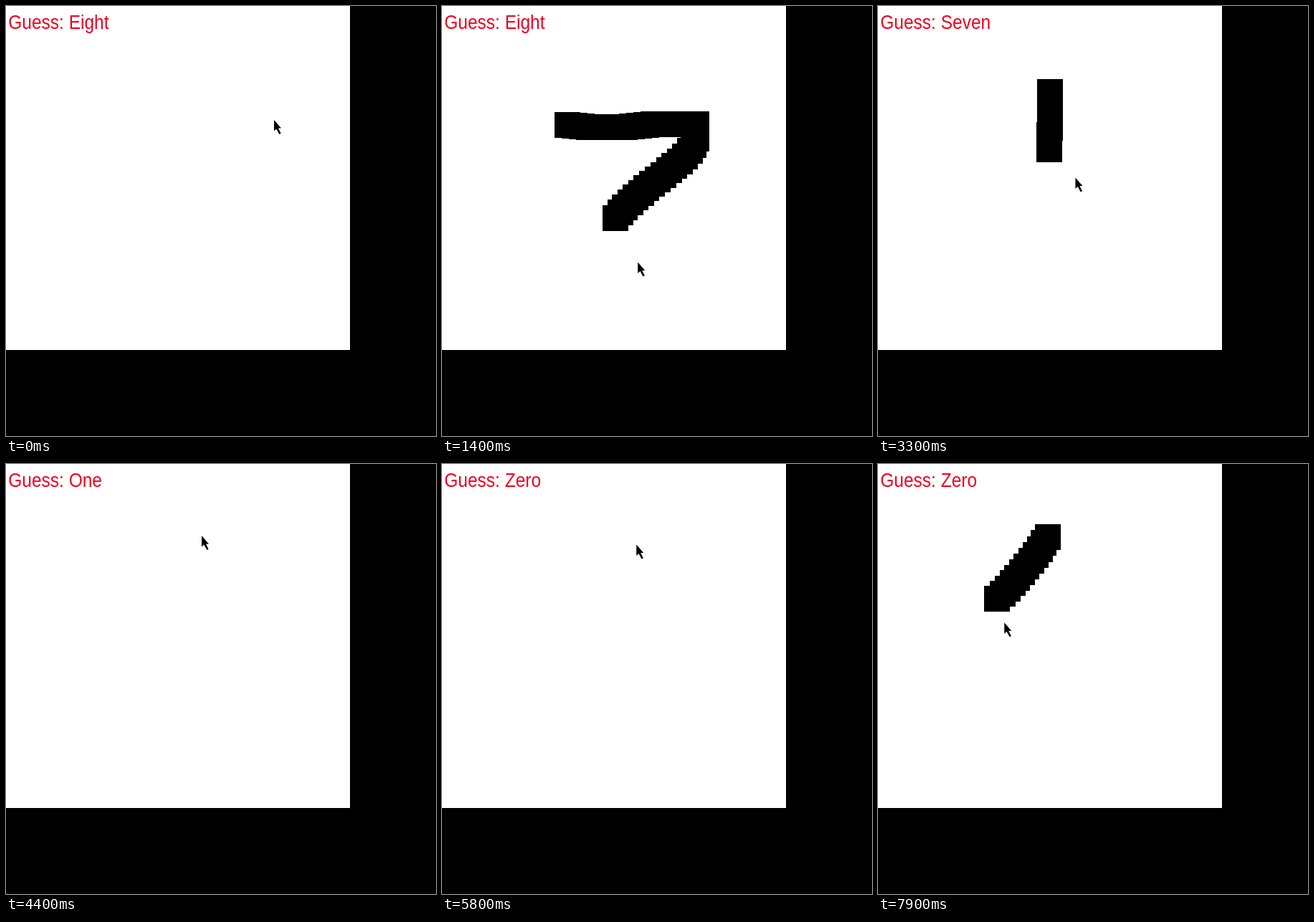
An HTML page that plays this animation: 600x600 px, repeating every 8 s.

```html
<!DOCTYPE html>
<html lang="en">
<head>
<meta charset="utf-8">
<title>Digit guess</title>
<style>
  html, body { margin: 0; width: 100%; height: 100%; overflow: hidden; background: #000; }
  svg { display: block; width: 100vw; height: 100vh; }
  text { font: 28px "Liberation Sans", Arial, sans-serif; fill: #f0001e; }
</style>
</head>
<body>
<svg viewBox="0 0 600 600">
  <rect width="600" height="600"/>
  <rect width="480" height="480" fill="#fff"/>
  <path id="ink" shape-rendering="crispEdges"/>
  <text id="guess" transform="translate(3.3 32) scale(.875 1)"></text>
  <path id="cursor" d="M0 0V15.5L3.2 12.6 7.4 20 9.6 18.8 6 11.5H10Z"
        stroke="#fff" stroke-width="1.5" paint-order="stroke"/>
</svg>
<script>
const LOOP = 8000, TICK = 100;
const PEN = 36, STEP = 10;    // square pen, distance between stamps
const POINTER_SCALE = 1.25;   // pointer space is 600 wide, the sheet 480

const linear = p => p;
const smooth = p => p * p * (3 - 2 * p);
const easeOut = p => Math.sin(p * Math.PI / 2);

const guesses = [[0, 'Eight'], [1700, 'Seven'], [3900, 'One'], [5700, 'Zero']];

// Points at even distances along a curve.
function walk(d) {
  const curve = document.createElementNS('http://www.w3.org/2000/svg', 'path');
  curve.setAttribute('d', d);
  const length = curve.getTotalLength(), steps = Math.round(length / STEP);
  return Array.from({ length: steps + 1 }, (_, i) => curve.getPointAtLength(length * i / steps));
}

const draw = (from, to, clear, d, ease = linear) => ({ from, to, clear, ease, points: walk(d) });
const hover = (from, to, d) => draw(from, to, 0, d, smooth);

const moves = [
  hover(100, 400, 'M299.2 127.2Q165 180 157 148'),

  // seven: bar, then diagonal
  draw(800, 1000, 1700, 'M157 148Q210 155 281 147H337'),
  draw(1000, 1560, 1700, 'M337 147V168C328 200 252 238 222 281S196 335 192 360'),
  hover(1900, 2800, 'M192 360Q205 250 222 102'),

  // one
  draw(3200, 3680, 3900, 'M222 102Q222 250 205 370', easeOut),
  hover(3900, 4400, 'M205 370Q207 220 218.4 80'),

  // zero: long loop, then closing arc
  draw(4700, 5300, 5700, 'M212 89C166 156 134 210 136 290 136 340 170 381 221 381 ' +
    '290 381 329 274 329 205 329 172 320 145 306 118'),
  draw(5300, 5600, 5700, 'M306 118C295 98 265 88 217 90'),
  hover(6100, 6600, 'M217 90Q150 112 89.8 109.4'),
  hover(6800, 7500, 'M89.8 109.4C60 135 140 125 219 84'),

  // two: first stroke
  draw(7700, 7900, LOOP, 'M219 84Q187 134 141 177')
];

const byId = id => document.getElementById(id);
const ink = byId('ink'), guess = byId('guess'), cursor = byId('cursor');

// Index of the point a move has reached at time t.
function reached({ from, to, ease, points }, t) {
  const p = Math.min(1, Math.max(0, (t - from) / (to - from)));
  return Math.round(ease(p) * (points.length - 1));
}

const stamp = ({ x, y }) => `M${Math.round(x)} ${Math.round(y)}h${PEN}v${PEN}h-${PEN}z`;

function render(time) {
  const t = Math.floor(time % LOOP / TICK) * TICK;
  const current = moves.findLast(m => m.from <= t) || moves[0];
  const { x, y } = current.points[reached(current, t)];
  cursor.setAttribute('transform', `translate(${x * POINTER_SCALE} ${y * POINTER_SCALE})`);

  // The ink trails the pointer by one stamp.
  ink.setAttribute('d', moves
    .filter(m => m.from <= t && t < m.clear)
    .flatMap(m => m.points.slice(0, reached(m, t)).map(stamp))
    .join(''));

  guess.textContent = 'Guess: ' + guesses.findLast(([from]) => from <= t)[1];
}

const start = performance.now();
function frame() {
  render(performance.now() - start);
  requestAnimationFrame(frame);
}
frame();
</script>
</body>
</html>
```
